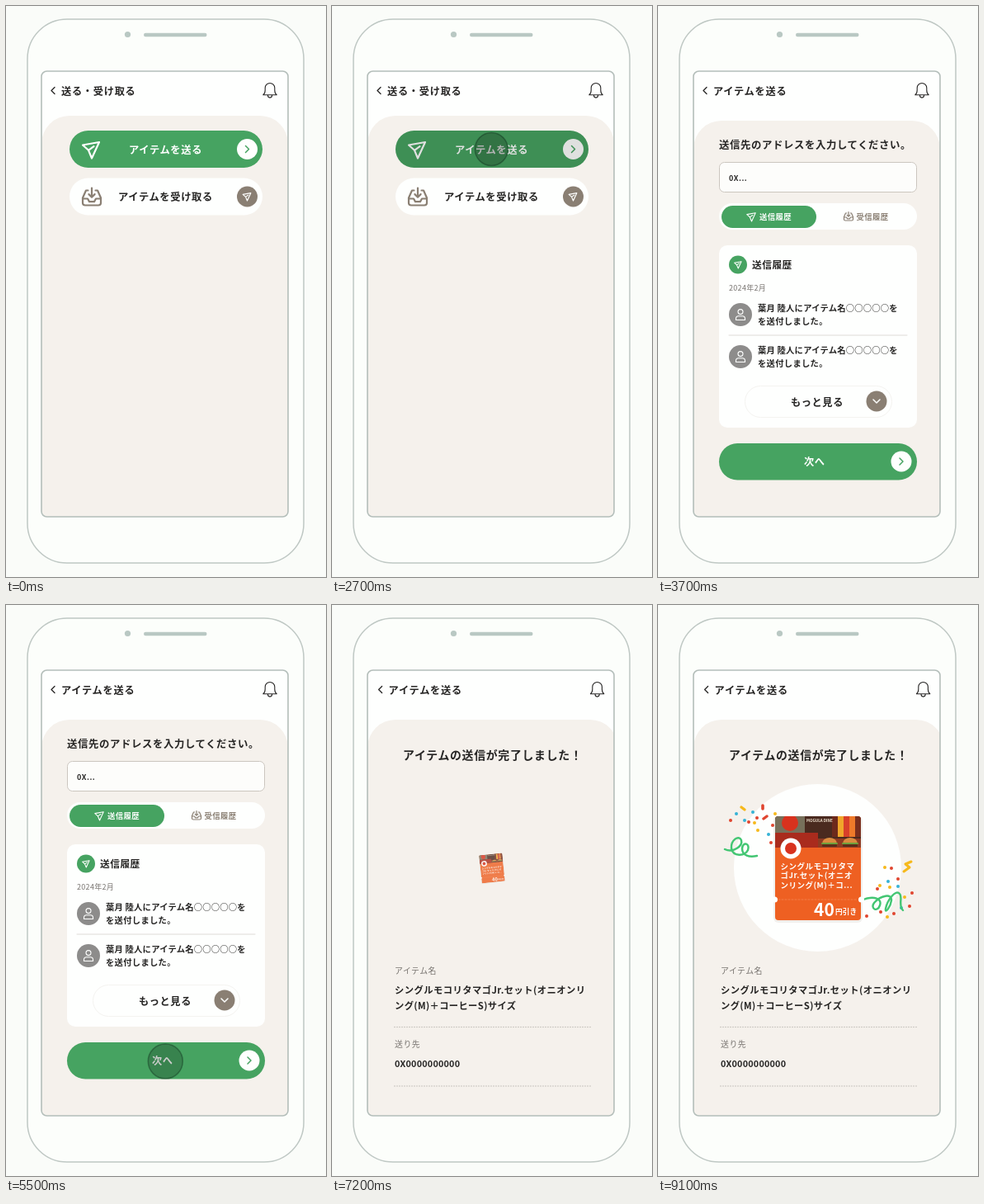
Write an HTML page that moves like this. It is 388 px wide and 692 px high and loops after 10000 ms.

```html
<!DOCTYPE html>
<html lang="ja">
<head>
<meta charset="utf-8">
<title>アイテムを送る</title>
<style>
html, body { margin: 0; width: 100%; height: 100%; overflow: hidden; background: #fafcf9; }
svg { display: block; width: 100%; height: 100%; }
text { font-family: "Noto Sans CJK JP", "Noto Sans CJK", "Noto Sans", sans-serif; font-weight: 700; white-space: pre; }
.line { fill: none; stroke-linecap: round; stroke-linejoin: round; }
</style>
</head>
<body>
<svg id="stage" viewBox="0 0 388 692" xmlns="http://www.w3.org/2000/svg"></svg>
<script>
const GREEN = '#46a361', TAUPE = '#8a7f73', BEIGE = '#f5f1ec', INK = '#262524', GREY = '#77736f', WHITE = '#fefffe';
const RED = '#e0452f', YELLOW = '#f6b91c', BLUE = '#36b3d6', ORANGE = '#ee6022';

// y is the vertical middle of the glyphs
const txt = (x, y, size, str, fill = INK, gap = .6, extra = '') =>
  `<text x="${x}" y="${y + size * .37}" font-size="${size}" fill="${fill}" letter-spacing="${gap}" ${extra}>${str}</text>`;
const box = (x, y, w, h, r, fill, extra = '') =>
  `<rect x="${x}" y="${y}" width="${w}" height="${h}" rx="${r}" fill="${fill}" ${extra}/>`;
const dot = (x, y, r, fill, extra = '') => `<circle cx="${x}" cy="${y}" r="${r}" fill="${fill}" ${extra}/>`;
const line = (d, color, width, extra = '') =>
  `<path class="line" d="${d}" stroke="${color}" stroke-width="${width}" ${extra}/>`;
const icon = (d, x, y, color, width, scale = 1) =>
  line(d, color, width / scale, `transform="translate(${x} ${y}) scale(${scale})"`);

const PLANE = 'M10-9L-10-5.5L-3 .8L1 10.5ZM-3 .8L3.5-3.8';
const TRAY = 'M-4.5-8H-7L-11 1V7a3 3 0 0 0 3 3H8a3 3 0 0 0 3-3V1L7-8H4.5M-11 2H-5l2 3.6H3L5 2H11M0-11V0M-3.6-3.4L0 .2L3.6-3.4';
const BELL = 'M-8.2 5.2Q-5.8 3.4-5.8-.6V-3.2A5.8 5.8 0 0 1 5.8-3.2V-.6Q5.8 3.4 8.2 5.2ZM-2.6 5.6A2.6 3 0 0 0 2.6 5.6';
const RIGHT = 'M-2-4L2 0L-2 4', LEFT = 'M2-4L-2 0L2 4', DOWN = 'M-4-2L0 2L4-2';
const PERSON = 'M3-3.4A3 3 0 1 1-3-3.4A3 3 0 1 1 3-3.4ZM-5.5 6.5V5Q-5.5 1.8-2.4 1.8H2.4Q5.5 1.8 5.5 5V6.5Z';

const page = (title, top, shift = 0) =>
  box(43, 79, 400, 540, 0, WHITE) + box(43, top, 299 + 3 * shift, 560, 34, BEIGE) +
  icon(LEFT, 57 + shift, 102.5, INK, 1.3) + txt(67 + shift, 103, 12.2, title, INK, .75) +
  icon(BELL, 320 + shift, 102.5, INK, 1.1);
const roundButton = (x, y, fill, d, color) => dot(x, y, 12.5, fill) + icon(d, x, y, color, 1.5);

function menuPage() {
  return page('送る・受け取る', 133) +
    box(77, 151, 234, 45, 22.5, GREEN) + icon(PLANE, 103, 174, WHITE, 2.2) +
    txt(149, 174, 12.3, 'アイテムを送る', WHITE) + roundButton(292.5, 173.5, WHITE, RIGHT, GREEN) +
    box(77, 208.5, 234, 45, 22.5, WHITE) + icon(TRAY, 104, 231.5, TAUPE, 2.2) +
    txt(136, 231.5, 12.3, 'アイテムを受け取る') +
    dot(292.5, 231, 12.5, TAUPE) + icon(PLANE, 292, 231, WHITE, 1.2, .48);
}

function historyItem(y) {
  return dot(100, y, 14, '#8d8c8b') + icon(PERSON, 100, y, WHITE, 1.1) +
    txt(121, y - 8, 10.3, '葉月 陸人にアイテム名○○○○○を', INK, .22) +
    txt(121, y + 8, 10.3, 'を送付しました。', INK, .3);
}

function formPage() {
  return page('アイテムを送る', 139) +
    txt(74, 168, 12.4, '送信先のアドレスを入力してください。') +
    box(74.5, 189.5, 239, 36, 6, '#fdfdfb', 'stroke="#cbc6bf"') + txt(86, 209, 9, '0X...', INK, .5) +
    box(74, 239, 240, 32, 16, WHITE) + box(77, 242, 115, 27, 13.5, GREEN) +
    icon(PLANE, 113, 255.5, WHITE, 1.1, .52) + txt(123, 256, 9.4, '送信履歴', WHITE, .4) +
    icon(TRAY, 231, 255, TAUPE, 1.2, .5) + txt(240.5, 256, 9.4, '受信履歴', TAUPE, .4) +
    box(74, 290, 240, 221, 10, WHITE) +
    dot(97, 313.5, 11, GREEN) + icon(PLANE, 96.8, 313.5, WHITE, 1.1, .42) +
    txt(114, 314, 11.7, '送信履歴', INK, .5) +
    txt(86, 342, 9, '2024年2月', GREY, .3, 'style="font-weight:500"') +
    historyItem(374) + line('M86 399H302', '#dedbd7', 1) + historyItem(425) +
    box(105.5, 460.5, 178, 38, 19, WHITE, 'stroke="#f4f3f0"') + txt(161, 480, 12.2, 'もっと見る') +
    roundButton(265, 479, TAUPE, DOWN, WHITE) +
    box(74, 530, 240, 44.5, 22.2, GREEN) + txt(177, 552.5, 12.2, '次へ', WHITE) +
    roundButton(295, 552, WHITE, RIGHT, GREEN);
}

function coupon() {
  const stripes = ['#6d2a1c', '#f0a62b', '#d8402a', '#ef7a2a', '#7a2f1d'];
  const burger = (x) =>
    `<path d="M${x - 9}-30a9 7 0 0 1 18 0z" fill="#d98b3f"/>` + box(x - 10, -31, 20, 2, 1, '#6fa03c') +
    box(x - 9, -29, 18, 3, 1, '#5a2d1a');
  return box(-54, -63, 108, 129, 6, '#5a4030', 'opacity=".08"') +
    '<g clip-path="url(#couponClip)">' + box(-52, -63, 104, 126, 0, ORANGE) +
    box(-52, -63, 104, 38, 0, '#4a2a1f') + box(-52, -63, 36, 20, 0, '#77705a') +
    box(-52, -43, 52, 18, 0, '#a92b1d') +
    stripes.map((c, i) => box(17 + i * 7, -63, 7, 25, 0, c)).join('') +
    box(0, -36, 52, 11, 0, '#8d3a22') + burger(14) + burger(39) +
    dot(-34, -55, 10, '#d8321e') + txt(-14, -58, 4.6, 'MOGULA DINE', '#f4e6d3', 0) +
    '</g>' +
    dot(-33, -24, 12.5, WHITE) + dot(-33, -24, 7, '#d8321e') +
    ['シングルモコリタマ', 'ゴJr.セット(オニオ', 'ンリング(M)＋コ...'].map((s, i) =>
      txt(-45.5, -3 + i * 11.8, 9.5, s, WHITE, .5)).join('') +
    line('M-48 38H48', '#f4834f', .8, 'stroke-dasharray="2 2"') +
    dot(-52.5, 38, 3.5, WHITE) + dot(52.5, 38, 3.5, WHITE) +
    txt(-5, 50.5, 21, '40', WHITE, 0) + txt(21, 53, 8.6, '円引き', WHITE, .2);
}

// triples of x, y, colour index
const LEFT_BITS = [88, 261, 0, 95, 253, 2, 105, 261, 2, 110, 263, 0, 117, 264, 1, 120, 258, 0, 115, 251, 2, 121, 273, 1,
  134, 278, 2, 142, 253, 1, 139, 267, 0, 137, 288, 0];
const RIGHT_BITS = [283, 319, 0, 275, 318, 1, 279, 335, 2, 291, 332, 0, 291, 341, 2, 269, 340, 1, 266, 344, 0, 281, 342, 1,
  308, 349, 0, 299, 354, 1, 305, 365, 0, 295, 367, 2, 270, 372, 0, 278, 378, 1, 253, 377, 0, 286, 374, 0];
const bits = (list) => {
  let s = '';
  for (let i = 0; i < list.length; i += 3) s += dot(list[i], list[i + 1], 2, [RED, YELLOW, BLUE][list[i + 2]]);
  return s;
};
const STREAMER = '#43c673';
const confettiLeft = bits(LEFT_BITS) + line('M101 245l4 3', YELLOW, 3.4) + line('M127 243v4', RED, 3.6) +
  line('M128 259l4-3', RED, 3.4) +
  line('M81 296C91 301 103 292 101 285C98 278 88 285 89 295C91 305 105 305 109 297C112 289 103 286 102 295C102 304 111 306 120 304', STREAMER, 2.5);
const confettiRight = bits(RIGHT_BITS) + line('M307 311l-7 3l5 4l-7 5', YELLOW, 3) +
  line('M249 357C262 352 272 356 269 364C266 373 257 368 262 361C270 352 284 349 283 358C282 366 275 375 276 368C278 358 288 344 293 350C297 354 291 364 297 370', STREAMER, 2.4);

function donePage() {
  const rule = (y) => line(`M76 ${y}H315`, '#b3afaa', 1.3, 'stroke-dasharray="0 3"');
  return page('アイテムを送る', 139, 1.6) +
    txt(86, 181.5, 13.9, 'アイテムの送信が完了しました！', INK, .7) +
    `<g id="disc">${dot(0, 0, 101.5, WHITE)}</g>` +
    `<g id="confL">${confettiLeft}</g><g id="confR">${confettiRight}</g>` +
    `<g id="coupon">${coupon()}</g>` +
    txt(76, 443, 9.9, 'アイテム名', GREY, .5, 'style="font-weight:500"') +
    txt(76, 467, 11.3, 'シングルモコリタマゴJr.セット(オニオンリ', INK, .45) +
    txt(76, 485.5, 11.3, 'ング(M)＋コーヒーS)サイズ', INK, .35) + rule(511.5) +
    txt(76, 532.5, 9.9, '送り先', GREY, .5, 'style="font-weight:500"') +
    txt(76, 556.5, 10.8, '0X0000000000', INK, .2) + rule(583);
}

const stage = document.getElementById('stage');
stage.innerHTML = `<defs>
  <clipPath id="screenClip"><rect x="43" y="79" width="299" height="540" rx="7"/></clipPath>
  <clipPath id="couponClip"><rect x="-52" y="-63" width="104" height="126" rx="4"/></clipPath>
  <filter id="smear" filterUnits="userSpaceOnUse" x="-60" y="60" width="620" height="580"
    color-interpolation-filters="sRGB"><feGaussianBlur id="blur" stdDeviation="0 0"/></filter>
  </defs>` +
  box(0, 0, 388, 692, 0, '#fafcf9') +
  box(26, 16, 335, 659, 48, '#fcfefb', 'stroke="#bfc8c4" stroke-width="1.5"') +
  dot(147.5, 34.5, 3.6, '#b9c8c3') + box(167, 32.8, 76.5, 4.4, 2.2, '#b9c8c3') +
  `<g clip-path="url(#screenClip)"><g id="menu">${menuPage()}</g><g id="form">${formPage()}</g><g id="done">${donePage()}</g>` +
  box(0, 0, 0, 0, 22.4, '#000', 'id="dim"') +
  dot(193.3, 0, 21, '#000', 'id="touch" fill-opacity=".2" stroke="#0b2a17" stroke-opacity=".4" stroke-width="1.5"') + '</g>' +
  box(43, 79, 299, 540, 6.5, 'none', 'stroke="#b4beba" stroke-width="1.6"');

const el = Object.fromEntries([...stage.querySelectorAll('[id]')].map((n) => [n.id, n]));
const set = (node, attrs) => { for (const k in attrs) node.setAttribute(k, attrs[k]); };

// linear track of time, value pairs
function track(t, ...p) {
  if (t <= p[0]) return p[1];
  for (let i = 2; i < p.length; i += 2)
    if (t <= p[i]) return p[i - 1] + (p[i + 1] - p[i - 1]) * (t - p[i - 2]) / (p[i] - p[i - 2]);
  return p[p.length - 1];
}

function slide(node, t, start) {
  const span = 470, left = 1 - Math.min(1, Math.max(0, (t - start) / span));
  set(node, { visibility: t > start ? 'visible' : 'hidden', transform: `translate(${300 * left ** 3} 0)` });
  if (left > 0 && left < 1) {
    set(el.blur, { stdDeviation: `${9 * 900 * left ** 2 / span} 0` });
    node.setAttribute('filter', 'url(#smear)');
  } else node.removeAttribute('filter');
}

function tap(t, start, press, y, button) {
  const u = track(t, start, 0, start + 800, 1);
  set(el.touch, {
    cy: y,
    r: 27 - 6 * (1 - (1 - u) ** 2) - track(t, press, 0, press + 200, 1),
    opacity: u * track(t, press + 250, 1, press + 600, 0)
  });
  set(el.dim, { ...button, opacity: track(t, press, 0, press + 200, .12, press + 300, .12, press + 600, 0) });
}

function draw(t) {
  if (t < 4000) tap(t, 1500, 2500, 173.5, { x: 77, y: 151, width: 234, height: 45 });
  else tap(t, 4700, 5700, 553, { x: 74, y: 530, width: 240, height: 44.5 });
  slide(el.form, t, 3230);
  slide(el.done, t, 6230);

  const disc = track(t, 7200, 0, 7300, .3, 7400, .7, 7500, .88, 7600, .955, 7700, .985, 7900, 1);
  set(el.disc, { transform: `translate(193.5 318.5) scale(${disc})` });
  const size = track(t, 7100, 0, 7200, .27, 7300, .62, 7400, .9, 7500, 1.03, 7600, 1.04, 7800, 1.01, 8100, 1);
  const turn = track(t, 7100, -8, 7200, -6, 7400, 4, 7600, 9.5, 7800, 3, 8100, 0);
  set(el.coupon, {
    transform: `translate(194 319) rotate(${turn}) scale(${size})`,
    opacity: track(t, 7100, .6, 7200, .8, 7300, 1)
  });
  const push = track(t, 7300, -3, 7400, -1, 7500, .5, 7600, 1, 7700, .8, 8100, 0);
  const show = track(t, 7300, 0, 7500, 1);
  set(el.confL, { transform: `translate(${-17 * push} ${-7 * push})`, opacity: show });
  set(el.confR, { transform: `translate(${10.5 * push} ${1.5 * push})`, opacity: show });
}

// the picture advances in tenths of a second
const begin = performance.now();
function tick() {
  draw(Math.floor((performance.now() - begin) % 10000 / 100) * 100);
  requestAnimationFrame(tick);
}
tick();
</script>
</body>
</html>
```
